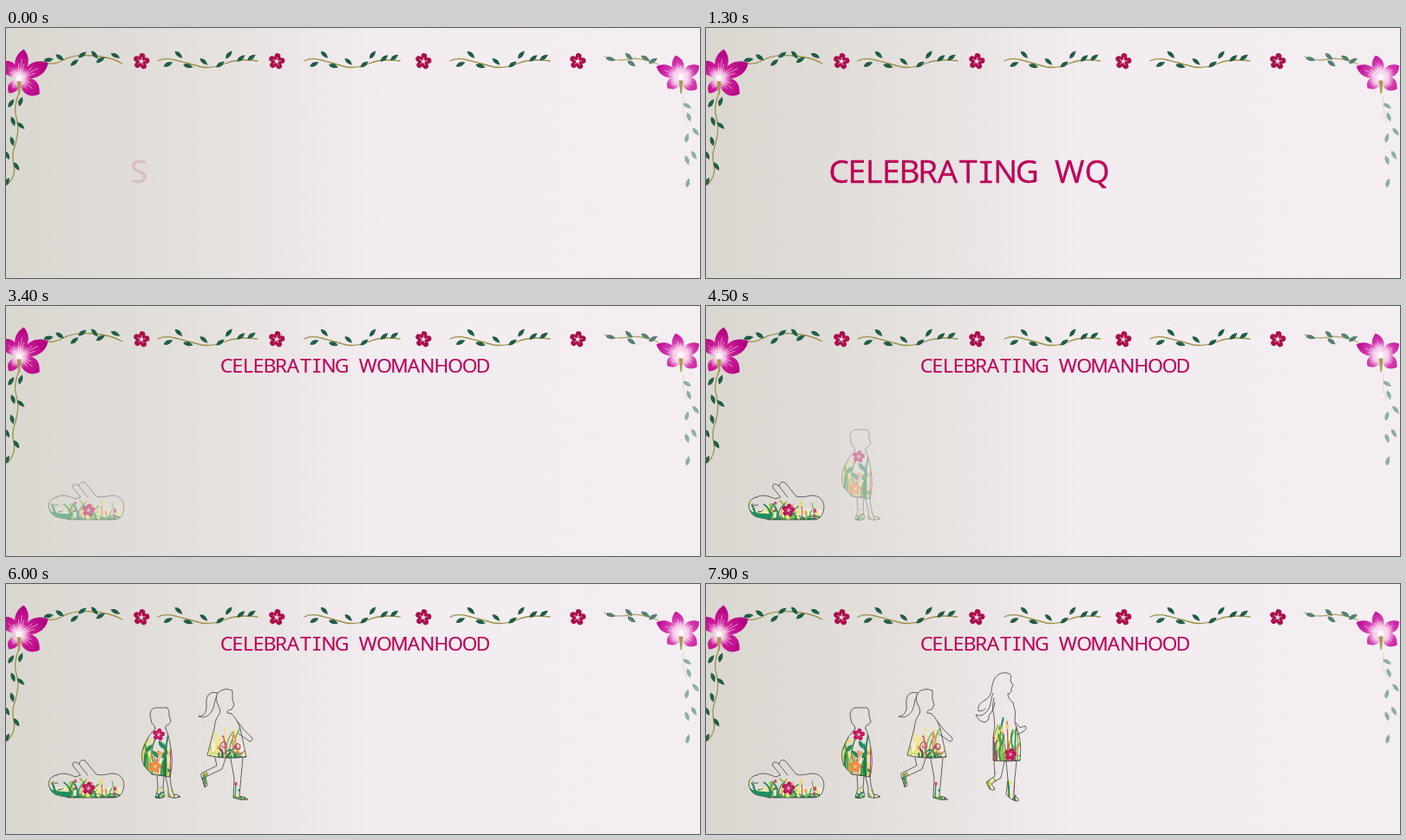
An HTML page for the animation above (8 s loop, 800 px wide and 289 px high).

```html
<!DOCTYPE html>
<html lang="en">
<head>
<meta charset="utf-8">
<title>Celebrating Womanhood</title>
<style>
html, body { margin: 0; width: 100%; height: 100%; overflow: hidden; background: #f4edf1; }
svg { display: block; width: 100%; height: 100%; }
#title, .figure { animation: 8s -30ms infinite; }
#title {
  font: 37px "Open Sans", sans-serif;
  fill: #bc0059; stroke: #bc0059; stroke-width: .4; stroke-linejoin: round;
  animation-name: settle;
}
#title .serif { font: 35px "Noto Sans Mono", monospace; }
.outline { fill: none; stroke: #434046; stroke-width: .8; stroke-linejoin: round; stroke-linecap: round; }
#baby { animation-name: baby; }
#toddler { animation-name: toddler; }
#girl { animation-name: girl; }
#teen { animation-name: teen; }
@keyframes settle {
  0%, 26.25% { transform: translate(143px, 178.5px) scale(1); animation-timing-function: steps(7); }
  35%, 100% { transform: translate(248px, 77px) scale(.613); }
}
@keyframes baby {
  0%, 37.5% { opacity: 0; animation-timing-function: steps(8); }
  47.5%, 100% { opacity: 1; }
}
@keyframes toddler {
  0%, 52.5% { opacity: 0; animation-timing-function: steps(7); }
  61.25%, 100% { opacity: 1; }
}
@keyframes girl {
  0%, 66.25% { opacity: 0; animation-timing-function: steps(7); }
  75%, 100% { opacity: 1; }
}
@keyframes teen {
  0%, 88.75% { opacity: 0; animation-timing-function: steps(7); }
  97.5%, 100% { opacity: 1; }
}
</style>
</head>
<body>
<svg viewBox="0 0 800 289" preserveAspectRatio="none">
  <defs>
    <linearGradient id="paper">
      <stop offset="0" stop-color="#dad7d1"/>
      <stop offset=".13" stop-color="#dedbd6"/>
      <stop offset=".3" stop-color="#e5e1de"/>
      <stop offset=".42" stop-color="#ece7e7"/>
      <stop offset=".54" stop-color="#f3ecf0"/>
      <stop offset="1" stop-color="#f4eef2"/>
    </linearGradient>
    <radialGradient id="deep" gradientUnits="userSpaceOnUse" cx="0" cy="0" r="33">
      <stop offset="0" stop-color="#fff5fb"/>
      <stop offset=".2" stop-color="#f3bfe1"/>
      <stop offset=".42" stop-color="#cb1c98"/>
      <stop offset="1" stop-color="#b10080"/>
    </radialGradient>
    <radialGradient id="soft" gradientUnits="userSpaceOnUse" cx="0" cy="0" r="29">
      <stop offset="0" stop-color="#fff5fb"/>
      <stop offset=".3" stop-color="#f5c9e8"/>
      <stop offset=".55" stop-color="#d53bb0"/>
      <stop offset="1" stop-color="#bf0a94"/>
    </radialGradient>
  </defs>
  <rect width="800" height="289" fill="url(#paper)"/>
  <g id="border"></g>
  <g id="figures"></g>
  <g id="title"></g>
</svg>
<script>
const $ = id => document.getElementById(id);

function el(parent, tag, attrs) {
  const node = document.createElementNS("http://www.w3.org/2000/svg", tag);
  for (const key in attrs) node.setAttribute(key, attrs[key]);
  return parent.appendChild(node);
}

function random(seed) {
  return () => (seed = seed * 16807 % 2147483647) / 2147483647;
}

// Garland

function leaf(parent, [x, y, angle], fill = "#14553d") {
  const g = el(parent, "g", { transform: `translate(${x} ${y}) rotate(${angle})` });
  el(g, "path", { d: "M-5.8 0Q-1 -5 5.8 0Q-1 4.4 -5.8 0", fill });
  el(g, "path", { d: "M-4 0H4", stroke: "#5f8f74", "stroke-width": .4 });
}

function vine(stem, leaves, dx = 0, scale = 1) {
  const g = el($("border"), "g", { transform: `translate(${dx} 0) scale(${scale} 1)` });
  el(g, "path", { d: stem, fill: "none", stroke: "#9b9247", "stroke-width": 1.3, "stroke-linecap": "round" });
  leaves.forEach(l => leaf(g, l));
  return g;
}

function blossom(parent, x, y, r, fill, heart = "#f3d9df") {
  const g = el(parent, "g", { transform: `translate(${x} ${y})` });
  for (let a = 10; a < 370; a += 72) {
    el(g, "ellipse", { cy: -r * .6, rx: r * .37, ry: r * .42, fill, transform: `rotate(${a})` });
    el(g, "path", { d: `M0 0V${-r * .5}`, stroke: heart, "stroke-width": r * .08, transform: `rotate(${a})` });
  }
  el(g, "circle", { r: r * .15, fill: heart });
}

function orchid(x, y, paint, petals) {
  const g = el($("border"), "g", { transform: `translate(${x} ${y})` });
  for (const [angle, len, w] of petals) {
    const p = el(g, "g", { transform: `rotate(${angle})` });
    el(p, "path", {
      d: `M0 0C${-w * .5} ${-len * .2} ${-w * 1.6} ${-len * .6} 0 ${-len}C${w * 1.5} ${-len * .7} ${w * .7} ${-len * .2} 0 0`,
      fill: `url(#${paint})`
    });
    el(p, "path", {
      d: `M0 -4V${-len * .65}M-1 -4L${-w * .35} ${-len * .5}M1 -4L${w * .35} ${-len * .5}`,
      stroke: "#fbe3f3", "stroke-width": .8, opacity: .7
    });
  }
  el(g, "path", { d: "M-2.4 4Q0 2 2.4 4L1 19H-.4Z", fill: "#a89a4c" });
  el(g, "circle", { r: 3.4, fill: "#fff6fb" });
}

const sprig = "M2 38Q10 34 22 37T52 45Q66 47 80 41T117 38";
const sprigLeaves = [
  [14, 42, -25], [26, 31, 42], [37, 44, 15], [55, 39, 40],
  [74, 42, -35], [84, 31, -50], [98, 35, -40], [110, 34, -35]
];
vine(sprig, sprigLeaves, 173);
vine(sprig, sprigLeaves, 342, .96);
vine(sprig, sprigLeaves, 510);
vine("M42 40Q54 44 66 37T100 32Q120 33 134 41", [
  [49, 37, -10], [62, 34, 35], [79, 40, -40], [88, 31, -35], [102, 31, 50], [109, 37, -30], [126, 32, 25]
]);
vine("M690 33Q703 39 717 36T752 42", [
  [697, 36, 15], [721, 41, 35], [718, 33, 45], [737, 35, 30], [746, 38, -30]
]).setAttribute("opacity", .75);
vine("M15 75Q8 92 12 104T11 134Q6 146 9 158T2 181", [
  [17, 85, -70], [6, 87, -55], [8, 108, 70], [17, 113, 40], [7, 131, 75], [1, 147, 60], [12, 160, 55], [1, 178, -60]
]);
const fade = el($("border"), "g", { opacity: .55 });
[[785, 90, 30], [787, 103, 70], [795, 120, 50], [785, 127, -75], [793, 147, 60], [785, 153, 70], [786, 179, -75]]
  .forEach(l => leaf(fade, l, "#2f7a5e"));
el(fade, "path", { d: "M781 78Q779 98 785 110", fill: "none", stroke: "#cfcbb0" });

[156, 312, 481, 659].forEach(x => blossom($("border"), x, 38.5, 9.3, "#aa0f4c"));
orchid(15, 58, "deep", [[316, 27, 9], [213, 21, 7], [128, 30, 11], [62, 38, 10], [9, 34, 9]]);
orchid(778, 57, "soft", [[294, 31, 8], [231, 20, 8], [126, 23, 9], [57, 25, 8], [-14, 26, 8]]);

// Figures

const greens = ["#1a7d52", "#23905a", "#4f9f45", "#8fbf45"];
const brights = ["#ecdf52", "#f0e673", "#f2e987", "#ef9c4e", "#d9406f"];

// Grass, stems and petals growing up from a base line inside an outline
function garden(figure, d, [x, w, base, h, n], hem, seed) {
  const rnd = random(seed), id = `clip${seed}`;
  el(el(figure, "clipPath", { id }), "path", { d });
  const g = el(figure, "g", { "clip-path": `url(#${id})`, fill: "none", "stroke-linecap": "round" });
  const pick = list => list[Math.floor(rnd() * list.length)];
  if (hem) {
    el(g, "rect", { x, y: base - h * .55, width: w, height: h * .55, fill: "#f6f3d8", opacity: .6 });
    el(g, "rect", { x: x - 5, y: base - 2, width: w + 10, height: 6, fill: "#1c8358" });
  }
  for (let i = 0; i < n; i++) {
    const px = x + rnd() * w, len = h * (.15 + .85 * rnd() ** 1.5), bend = (rnd() - .5) * 16;
    el(g, "path", {
      d: `M${px} ${base}q${-bend * .6} ${-len * .6} ${bend} ${-len}`,
      stroke: rnd() < .65 ? pick(greens) : pick(brights), "stroke-width": .7 + rnd() * 1.5
    });
    if (rnd() < .5) el(g, "ellipse", {
      cx: px + bend, cy: base - len, rx: 1 + rnd(), ry: 1.5 + rnd() * 1.5, fill: pick(brights)
    });
  }
}

// Open outlines leave the neck and leg tops undrawn
function figure(id, parts, lines) {
  const g = el($("figures"), "g", { id, class: "figure" });
  parts.forEach(([d, plot, hem], i) => {
    garden(g, d, plot, hem, id.length * 1009 + i * 77 + plot[0]);
    el(g, "path", { d, class: "outline" });
  });
  el(g, "path", { d: lines, class: "outline" });
  return g;
}

const baby = figure("baby", [[
  "M58 221C65 217 73 220 80 223L86 221L77 210Q76 205 81 206L84 208Q86 202 91 204L104 220C113 222 117 219 124 219C134 220 138 229 135 238C133 245 129 247 123 247L72 247C64 244 57 246 52 239C47 231 49 223 58 221Z",
  [51, 83, 247, 22, 42], true
]], "M84 208L94 221M54 229q3 3 6 1M60 237q4 2 6-1");
el(baby, "path", { d: "M51 237Q56 246 72 246L78 240Q62 241 51 237Z", fill: "#1c8f60" });
blossom(baby, 95, 236, 7.5, "#b8145c", "#f0a6b8");

const toddler = figure("toddler", [
  ["M172 167Q163 176 159 187Q154 198 159 210L168 220L189 223Q193 207 190 190Q188 175 184 167", [158, 32, 222, 48, 34], true],
  ["M174 222L175 236L172 247Q178 249 183 246L181 236L182 223", [172, 10, 248, 18, 7]],
  ["M184 223L187 236L187 246Q194 249 201 246Q198 243 193 243L190 232L189 222", [185, 14, 248, 18, 7]]
], "M172 167Q172 163 168 161L166 151Q167 144 172 143L186 143Q189 147 188 152L190 159L187 163Q183 163 184 167M172 179Q166 194 169 204L181 212");
blossom(toddler, 176, 174, 7, "#c0135c", "#f2a9bd");
blossom(toddler, 172, 211, 7, "#ef8742", "#f8d27c");
[[179, 186, 60], [165, 190, -50], [183, 197, -60], [172, 197, 50]].forEach(l => leaf(toddler, l, "#1f8a5a"));

const girl = figure("girl", [
  ["M246 150Q241 156 240 167L232 198Q252 203 277 200L272 176Q269 158 260 150", [234, 41, 201, 34, 36], true],
  ["M241 201L243 210L225 219Q224 222 227 228L229 235L232 233L230 223L249 214L253 202", [225, 27, 235, 26, 8]],
  ["M259 202L263 224L262 247Q270 251 279 249Q276 246 269 245L271 223L273 201", [261, 15, 250, 24, 8]]
], "M246 150Q248 147 245 141Q240 132 244 126Q251 119 261 123L261 133L263 140L260 145Q254 146 255 149L260 150M244 126C234 123 230 130 231 139C232 148 228 153 222 153C231 157 239 148 240 139Q241 132 243 130M267 159Q274 170 283 177Q286 181 281 182Q274 177 268 173");
el(girl, "path", { d: "M249 196c-6-10 2-18 5-11s-7 5-4 1M261 196c0-12 9-14 9-8s-6 3-4 1", fill: "none", stroke: "#c2477c", "stroke-width": 1.2 });
el(girl, "path", { d: "M228 162v3M228 178v3M228 205v3", stroke: "#ddd08c" });

const teen = figure("teen", [
  ["M332 132Q329 142 332 152Q334 164 331 178L331 204Q347 206 362 204Q364 184 360 172L356 160Q358 148 354 137Q348 133 348 127", [332, 29, 205, 52, 38], true],
  ["M332 205L333 222L323 229L327 237Q331 240 333 237L329 231L340 224L344 205", [324, 18, 238, 30, 8]],
  ["M346 205L348 226L346 243Q352 251 360 251Q361 248 355 243L356 224L358 205", [347, 11, 251, 40, 8]]
], "M348 127Q353 126 352 121L354 117L351 112Q353 104 348 103Q338 101 333 109C327 119 332 128 322 134Q312 139 314 147Q319 148 322 144M331 126C327 135 330 142 322 149Q317 154 311 151Q313 158 321 160Q327 158 326 152Q332 146 333 137M357 160L362 166L368 164Q371 168 365 171L359 174");
blossom(teen, 351, 197, 7, "#c0135c", "#f2a9bd");
el(teen, "path", { d: "M339 203C334 186 346 184 343 174M335 203Q331 188 336 180M355 192Q349 178 354 168", fill: "none", stroke: "#1f8a5a", "stroke-width": 1.6 });

// Title: each slot shows a rolling letter that fades in, then its own letter

const words = "CELEBRATING WOMANHOOD";
const rolls = "SKMHPZDWUOXJFQBVRLYGT";
const advance = {
  C: .603, E: .626, L: .551, B: .63, R: .63, A: .731, T: .679, I: .546, N: .798,
  G: .679, W: 1.038, O: .798, M: .882, H: .768, D: .722, " ": .598
};
const em = 33.6, slotTime = 94, lead = 14;
let pen = 0;
const slots = [...words].map(char => {
  const left = pen, width = advance[char] * em;
  pen += width;
  const node = el($("title"), "text", { x: left + width / 2, "text-anchor": "middle" });
  node.textContent = char;
  if (char === "I") node.setAttribute("class", "serif");
  return { left, node };
});
const roller = el($("title"), "text", {});
const clock = $("title").getAnimations()[0];

function draw() {
  // Same 30 ms head start as the stylesheet, so both change together
  const time = ((clock.currentTime || 0) + 30) % 8000;
  const pos = (Math.floor(time / 100) * 100 + lead) / slotTime;
  const now = Math.floor(pos);
  slots.forEach((slot, i) => slot.node.setAttribute("opacity", i < now ? 1 : 0));
  const rolling = now < words.length && words[now] !== " ";
  roller.setAttribute("opacity", rolling ? pos - now : 0);
  if (rolling) {
    roller.setAttribute("x", slots[now].left);
    roller.textContent = rolls[now];
  }
  requestAnimationFrame(draw);
}
draw();
</script>
</body>
</html>
```
